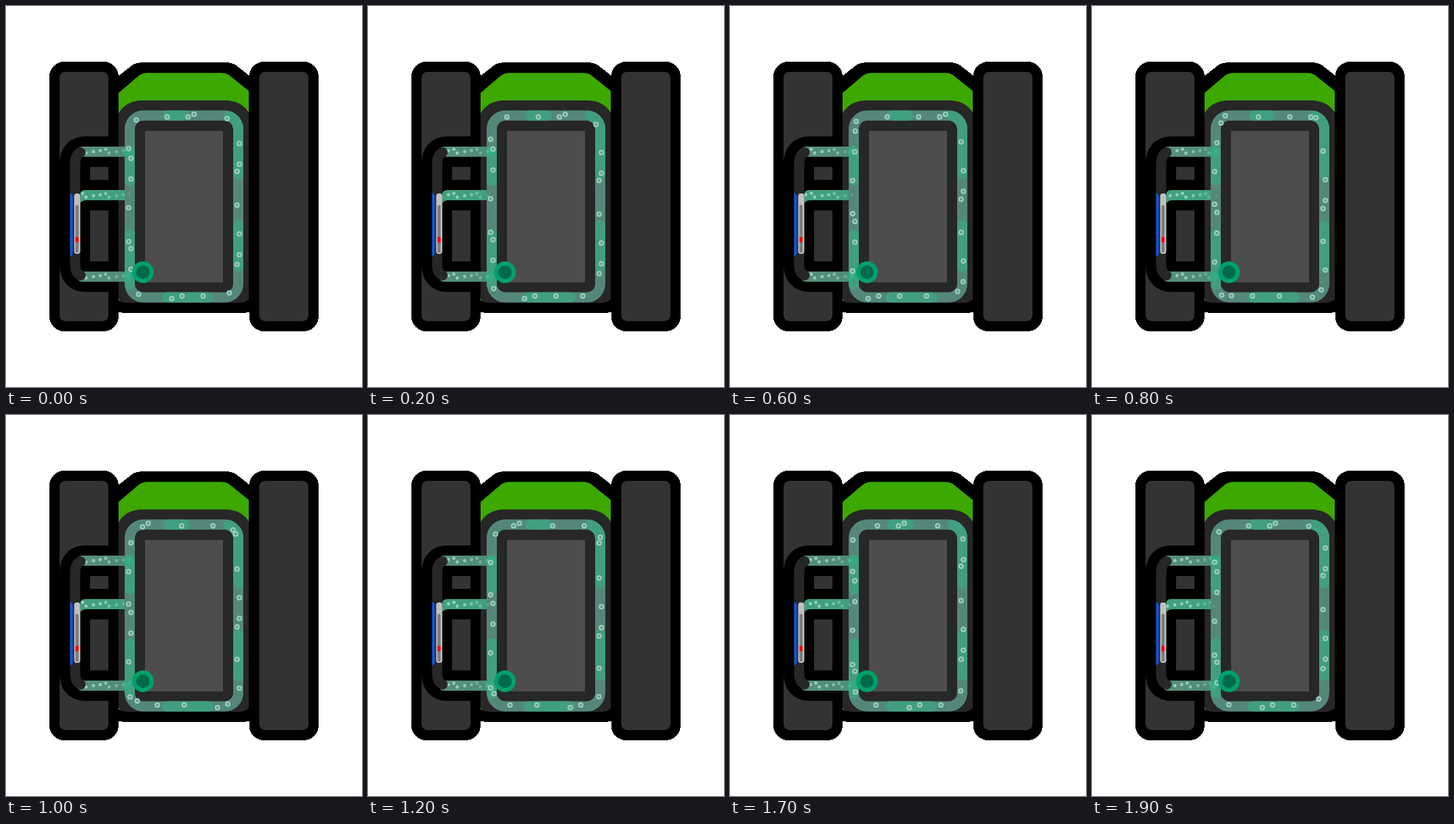
An HTML page for the animation above (2 s loop, 525 by 561 pixels).

```html
<!DOCTYPE html>
<html>
<head>
<meta charset="utf-8">
<style>
  html, body { margin: 0; width: 100%; height: 100%; overflow: hidden; background: #fff; }
  svg { display: block; width: 525px; height: 561px; }
</style>
</head>
<body>
<svg viewBox="0 0 525 561" fill="none">
  <defs>
    <linearGradient id="pipe" gradientUnits="userSpaceOnUse" x1="110" y1="0" x2="188" y2="0">
      <stop offset="0" stop-color="#58907f"/>
      <stop offset=".75" stop-color="#508b79"/>
      <stop offset="1" stop-color="#43977c"/>
    </linearGradient>
    <path id="loop" d="M182.5 295.2V187.3a26 26 0 0 1 26-26H316.5a26 26 0 0 1 26 26V403a26 26 0 0 1-26 26H208.5a26 26 0 0 1-26-26Z"/>
  </defs>

  <!-- hull -->
  <path fill="#000" shape-rendering="crispEdges" d="M160 107.5L187 86.5Q193 83 204 83H322Q333 83 339 87L365 107.5V449Q355 452 347 452H178Q170 452 160 449Z"/>
  <path fill="#3ca800" d="M166 128L196 102.5Q202 98.5 208 98.5H318Q324 98.5 328 101L358 125V165H166Z"/>
  <path fill="#272727" d="M166 158Q177 139 202 139H322Q347 139 358 157V432Q352 437 344 437H178Q172 437 166 434Z"/>
  <path stroke="#3ca800" d="M166.5 431v3"/>

  <!-- tracks -->
  <g fill="#000" shape-rendering="crispEdges">
    <rect x="64" y="82" width="102" height="397" rx="22"/>
    <rect x="358.5" y="82" width="102.5" height="397" rx="22"/>
  </g>
  <g fill="#333">
    <rect x="79" y="97" width="72" height="367" rx="8.5"/>
    <rect x="373.5" y="97" width="72.5" height="367" rx="8.5"/>
  </g>

  <!-- side loop -->
  <path stroke="#000" stroke-width="45" d="M166 214.5H117Q101.5 214.5 101.5 232V381Q101.5 398.5 117 398.5H166M101.5 278.5H166"/>
  <path stroke="url(#pipe)" stroke-width="15" stroke-linecap="round" d="M112 214.5H180M112 398.5H178"/>
  <path fill="#41a080" d="M109 291V279Q109 271 117 271H176Q182 271 182 278.5T176 286H119Q112 286 109 291Z"/>

  <!-- tank -->
  <rect x="205" y="184" width="115" height="223" fill="#4d4d4d"/>
  <rect x="182.5" y="161.3" width="160" height="267.7" rx="20" stroke="#54877a" stroke-width="15"/>
  <path stroke="#429e80" stroke-width="15" stroke-linecap="round"
    d="M239 161.3H263M328 162A20 20 0 0 1 342.5 181.3V248M342.5 323V384M237 429H298M182.5 410V336M182.5 257V213"/>
  <g fill="#2bb588" opacity=".55">
    <circle cx="181" cy="214.5" r="7"/>
    <circle cx="179" cy="398.5" r="7"/>
  </g>
  <g id="beads" fill="#a6dccb"></g>
  <g id="rings" fill="#5f9f8d" stroke="#9bd2c0" stroke-width="2"></g>

  <!-- gauge -->
  <path stroke="#272727" stroke-width="15" stroke-linecap="round" d="M110 215.5Q102 219 102 232V381Q102 393 110 396.5"/>
  <path fill="#1155e0" d="M94.5 275Q98.5 277 98.5 281V363Q98.5 367 94.5 369Z"/>
  <rect x="100.5" y="276" width="9" height="89" rx="4" fill="#c0c0c0"/>
  <rect x="102.5" y="293" width="4.5" height="70" rx="1.5" fill="#7c7c7c"/>
  <rect x="102.5" y="340" width="4.5" height="8" fill="#f00"/>

  <circle cx="202" cy="392" r="16" fill="#00a06c"/>
  <circle cx="202" cy="392" r="10" fill="#006b4a"/>
</svg>
<script>
const LOOP = 2000, STEP = 100, LANES = 6, MIDDLE = 295.2;
const path = document.getElementById("loop");
const length = path.getTotalLength(), pitch = length / LANES;

// One group of bubbles: lag behind the loop's start, sideways shift, vertical scale
const group = [
  { lag: 51, dx: -1.7, sy: 1.014 },
  { lag: 63, dx: 1.7, sy: 0.985 },
  { lag: 94, dx: 1.7, sy: 0.985 },
  { lag: 137, dx: -1.7, sy: 0.985 }
];

// Small bubbles repeat every GAP pixels
const GAP = 34, START = 111, END = 184;
const motif = [{ x: 3, y: -1 }, { x: 11, y: -3 }, { x: 16, y: 2.5 }, { x: 27, y: 0.5 }];

function dot(id, r) {
  const c = document.createElementNS("http://www.w3.org/2000/svg", "circle");
  c.setAttribute("r", r);
  return document.getElementById(id).appendChild(c);
}

function place(c, x, y) {
  c.setAttribute("cx", x);
  c.setAttribute("cy", y);
}

const rings = group.flatMap(g =>
  Array.from({ length: LANES }, (_, lane) => ({ ...g, lane, el: dot("rings", 3) })));

const beads = [214, 279, 398].flatMap(top => motif.flatMap(({ x, y }) =>
  [0, 1, 2].map(n => ({ x: x + n * GAP, y: top + y, el: dot("beads", 2.4) }))));

function draw(t) {
  const p = t / LOOP;
  for (const { lag, dx, sy, lane, el } of rings) {
    const at = path.getPointAtLength(((p + lane) * pitch - lag + length) % length);
    place(el, at.x + dx, MIDDLE + (at.y - MIDDLE) * sy);
  }
  for (const { x, y, el } of beads) {
    const px = 102 + (x + p * 4 * GAP) % (3 * GAP);
    place(el, px, y);
    const shown = px > START && px < END;
    el.setAttribute("opacity", shown ? Math.min(0.8, (192 - px) / 65) : 0);
  }
}

function tick(now) {
  draw(Math.floor((now % LOOP) / STEP) * STEP);
  requestAnimationFrame(tick);
}
draw(0);
requestAnimationFrame(tick);
</script>
</body>
</html>
```
